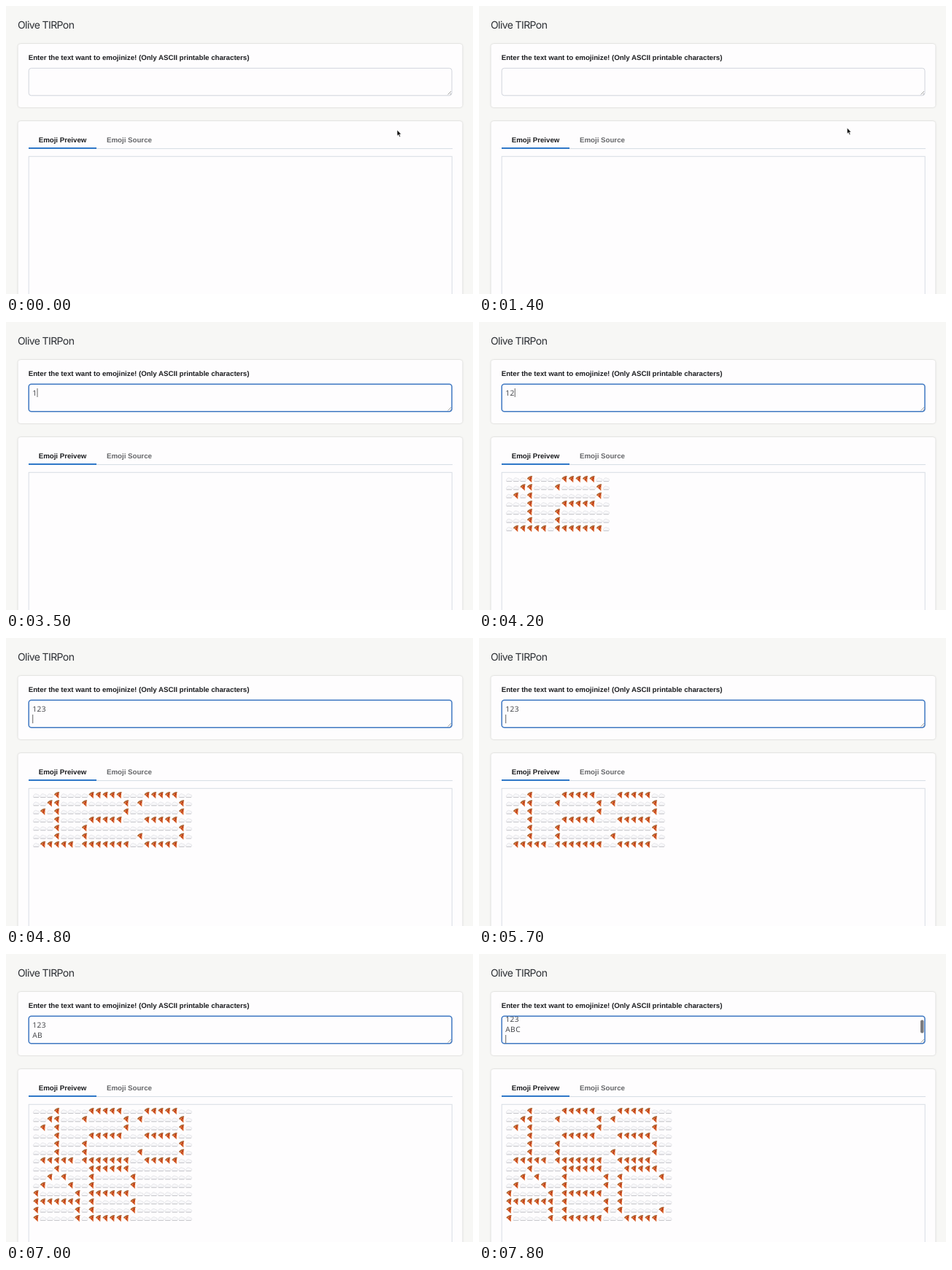
An HTML page that plays this animation: 640 by 395 pixels, repeating every 8000 ms.

```html
<!DOCTYPE html>
<html lang="en">
<head>
<meta charset="utf-8">
<style>
  html, body { margin: 0; height: 100%; overflow: hidden; background: #f7f7f5; }
  svg { display: block; width: 100%; height: 100%; text-rendering: geometricPrecision; }
  .card { fill: #fefdfe; filter: drop-shadow(0 .8px .8px #0003); }
  .title { font: 14px Inter, sans-serif; letter-spacing: -.6px; fill: #2b2e33; }
  .bold { font: bold 9.7px "Liberation Sans", Arial, sans-serif; fill: #1c1d20; }
  .typed { font: 10.2px "Open Sans", sans-serif; letter-spacing: .45px; fill: #3a3c40; }
</style>
</head>
<body>
<svg viewBox="0 0 640 395">
  <defs>
    <clipPath id="inside"><rect x="32" y="86" width="578" height="36.5"/></clipPath>
    <g id="pizza">
      <path d="M1.5 4.3Q3.6 1.2 7.7.9L7.2 9.8Z" fill="#d9602a"/>
      <path d="M1.6 4.3Q3.6 1.5 7.5 1.2" fill="none" stroke="#a8683a" stroke-width="1.3" stroke-linecap="round"/>
      <path d="M3.4 4.6L4.6 3.6M6.1 6.6L6.8 5.2" stroke="#eea04a"/>
      <circle cx="5.9" cy="3.6" r="1" fill="#b0301c"/>
      <circle cx="5.2" cy="6" r=".9" fill="#b0301c"/>
    </g>
    <g id="cloud">
      <path d="M1.9 8.1A1.6 1.6 0 0 1 1.8 5.1A2.7 2.5 0 0 1 6.6 4.3A1.9 1.9 0 0 1 7.6 8.1Z"
            fill="#f8f8fa" stroke="#dedee2" stroke-width=".7"/>
      <path d="M1.2 8H8.3" stroke="#bebec3" stroke-width=".8"/>
    </g>
  </defs>

  <text class="title" x="16" y="31">Olive TIRPon</text>

  <rect class="card" x="16.5" y="52" width="609" height="87" rx="4"/>
  <text class="bold" x="30.7" y="74.4">Enter the text want to emojinize! (Only ASCII printable characters)</text>
  <rect id="field" x="31.2" y="85.3" width="579.8" height="37.5" rx="3.5" fill="#fefdfe"/>
  <path d="M605.5 121.5L610 117M608.5 121.5L610 120" stroke="#8b8b8b" stroke-width=".8"/>
  <g clip-path="url(#inside)">
    <g id="lines">
      <text class="typed" x="36.2" y="100.7"/>
      <text class="typed" x="36.2" y="114.7"/>
      <text class="typed" x="36.2" y="128.7"/>
      <rect id="caret" width="1" height="12" fill="#666"/>
    </g>
    <rect id="thumb" x="605" y="90.5" width="4.5" height="18" rx="2" fill="#7b7b7d"/>
  </g>

  <rect class="card" x="16.5" y="158" width="609" height="260" rx="4"/>
  <text class="bold" x="44.7" y="186.8">Emoji Preivew</text>
  <text class="bold" x="138" y="186.8" style="fill:#66676a">Emoji Source</text>
  <path d="M31 195.6H612" stroke="#d6dce4"/>
  <path d="M31 195H124" stroke="#2f78c8" stroke-width="1.8"/>
  <rect x="31.2" y="206.3" width="580" height="220" fill="#fefdfe" stroke="#d8dce4"/>
  <g id="grid"></g>

  <g id="mouse">
    <path id="arrow" d="M0 0V8.2L1.9 6.5L3.2 9.6L4.6 9L3.3 6H5.7Z" fill="#111" stroke="#fff" stroke-width=".6"/>
    <path id="beam" d="M-2-5Q0-5 0-4Q0-5 2-5M0-4V4M-2 5Q0 5 0 4Q0 5 2 5M-1 1H1" fill="none" stroke="#333" stroke-width=".9"/>
  </g>
</svg>
<script>
const $ = id => document.getElementById(id);
const LOOP = 8000, COLS = 24, ROWS = 14;
const text = '123\nABC\n';
const typedAt = [3500, 4100, 4500, 4800, 5800, 6400, 7100, 7500];
const drawnAt = [3800, 4200, 4600, 4900, 6000, 6500, 7200, 7600];
const caretOff = [[0, 2500], [3100, 3500], [5300, 5600], [6900, 7100]];

const glyphs = {
  1: '   #   /  ##   / # #   /   #   /   #   /   #   / ##### ',
  2: ' #####  /#     # /      # / #####  /#       /#       /####### ',
  3: ' #####  /#     # /      # / #####  /      # /#     # / #####  ',
  A: '   #    /  # #   / #   #  /#     # /####### /#     # /#     # ',
  B: '######  /#     # /#     # /######  /#     # /#     # /######  ',
  C: ' #####  /#     # /#       /#       /#       /#     # / #####  '
};

const cells = [];
for (let i = 0; i < COLS * ROWS; i++) {
  const use = document.createElementNS('http://www.w3.org/2000/svg', 'use');
  use.setAttribute('x', 36.5 + 9.5 * (i % COLS));
  use.setAttribute('y', 210.5 + 11.3 * Math.floor(i / COLS));
  cells.push($('grid').appendChild(use));
}
const lines = [...document.querySelectorAll('.typed')];

const show = (el, on) => el.setAttribute('visibility', on ? 'visible' : 'hidden');
const progress = (t, from, to) => {
  const p = Math.min(1, Math.max(0, (t - from) / (to - from)));
  return p * p * (3 - 2 * p);
};
const textUntil = (times, t) => text.slice(0, times.filter(at => at <= t).length);

function banner(str) {
  return str.trim().split('\n').flatMap(line =>
    [0, 1, 2, 3, 4, 5, 6].map(r =>
      [...line].map(ch => glyphs[ch].split('/')[r]).join('')));
}

let lastDrawn;
function drawPreview(str) {
  if (str === lastDrawn) return;
  lastDrawn = str;
  const rows = banner(str);
  const width = Math.max(...rows.map(r => r.length));
  cells.forEach((cell, i) => {
    const row = rows[Math.floor(i / COLS)], col = i % COLS;
    show(cell, row !== undefined && col < width);
    cell.setAttribute('href', row && row[col] === '#' ? '#pizza' : '#cloud');
  });
}

function drawField(t) {
  const focused = t >= 2500;
  $('field').setAttribute('stroke', focused ? '#3f78c2' : '#d0d4dc');
  $('field').setAttribute('stroke-width', focused ? 1.5 : 1);

  const parts = textUntil(typedAt, t).split('\n');
  lines.forEach((el, i) => el.textContent = parts[i] || '');
  const last = parts.length - 1;
  const width = parts[last] ? lines[last].getComputedTextLength() : 0;
  $('caret').setAttribute('x', 36.2 + width);
  $('caret').setAttribute('y', 91 + 14 * last);
  show($('caret'), !caretOff.some(([a, b]) => t >= a && t < b));

  const scrolled = last > 1;
  $('lines').setAttribute('transform', `translate(0 ${scrolled ? -8 : 0})`);
  show($('thumb'), scrolled);
}

function drawMouse(t) {
  const a = progress(t, 1300, 1700), b = progress(t, 1800, 2100);
  const x = 536 - 202 * a - 36.5 * b, y = 170 - 19 * a - 39.5 * b;
  const overField = y < 123, visible = t < 3500;
  $('mouse').setAttribute('transform', `translate(${x} ${y})`);
  show($('arrow'), visible && !overField);
  show($('beam'), visible && overField);
}

function frame(now) {
  const t = Math.floor(now % LOOP / 100) * 100; // ten steps a second
  drawField(t);
  drawPreview(textUntil(drawnAt, t));
  drawMouse(t);
  requestAnimationFrame(frame);
}
frame(performance.now());
</script>
</body>
</html>
```
